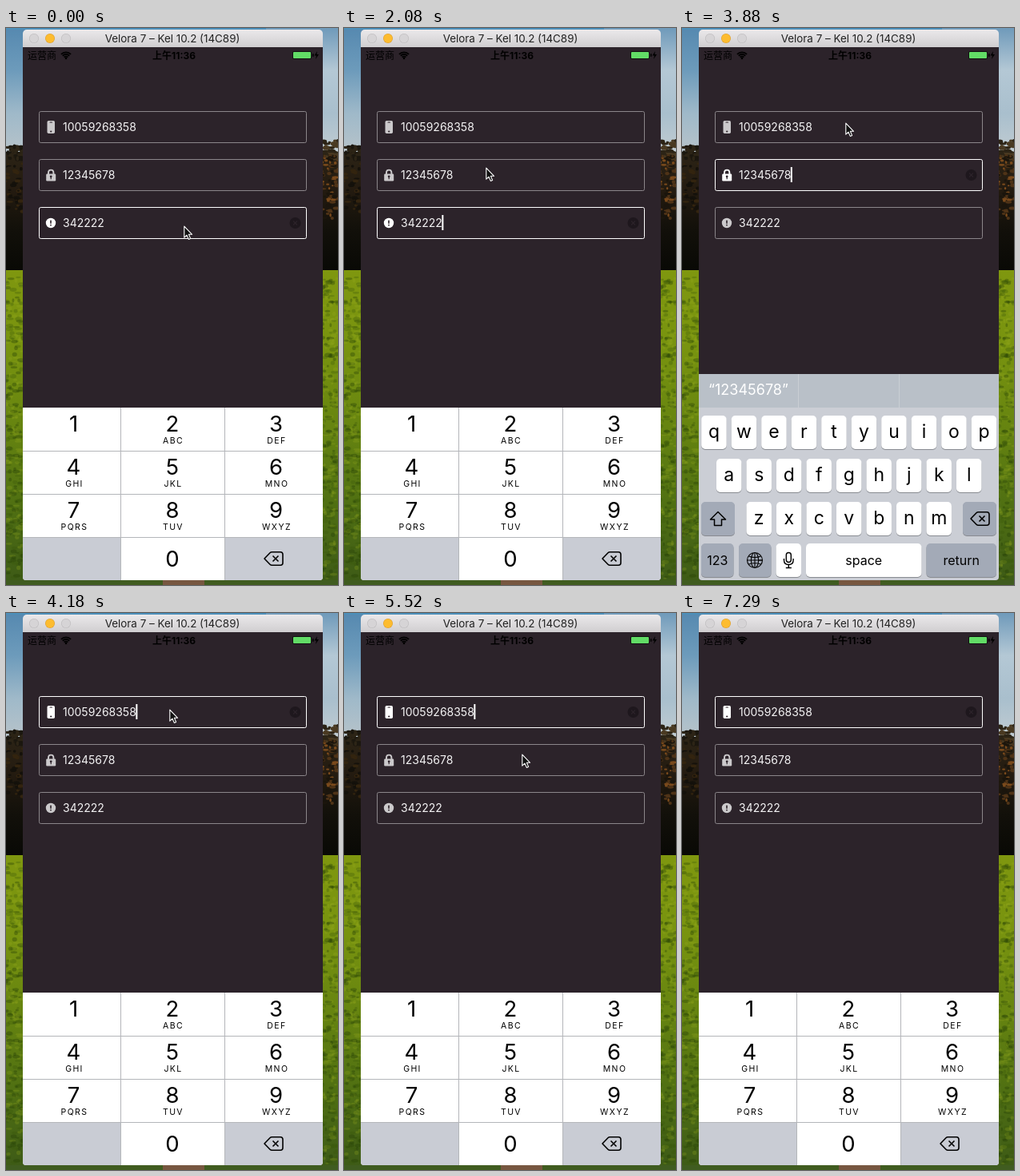
Write an HTML page with a canvas that moves like this. It is 415 by 697 pixels and loops after 7.39 s.

```html
<!DOCTYPE html>
<html lang="zh">
<head>
<meta charset="utf-8">
<style>
html, body { margin: 0; width: 415px; height: 697px; overflow: hidden; }
canvas { display: block; }
</style>
</head>
<body>
<canvas id="stage" width="415" height="697"></canvas>
<script>
const W = 415, H = 697, LOOP = 7390, STEPS = 50, DARK = '#2c232a';
const FONT = 'Inter, Roboto, sans-serif', CJK = '"Noto Sans CJK SC", "Noto Sans CJK", sans-serif';
const screen = document.getElementById('stage').getContext('2d');
let c = screen;

// All times below are counted in steps of the loop
const taps = [{ at: -12.5, field: 2 }, { at: 15, field: 1 }, { at: 28, field: 0 }, { at: 36, field: 0 }];
const pointer = [[2, 222, 247], [14, 177, 174], [19, 170, 182], [26, 204, 118],
  [28, 204, 120], [37, 222, 176], [45, 372, 634]];
const values = ['10059268358', '12345678', '342222'];

const clamp = v => Math.max(0, Math.min(1, v));
const smooth = v => v * v * (3 - 2 * v);

// Damped swing that starts two steps after a tap
const shakeAt = k => k < 0 ? 0 : 8.5 * Math.exp(-.87 * k) * Math.cos(Math.PI * k);
const caretAt = k => clamp(1.4 + 2 * Math.cos((k - 2) / 7.5 * 2 * Math.PI));

function pointerAt(n) {
  const i = pointer.findIndex(p => p[0] > n);
  const b = pointer[i], a = pointer[i - 1] || b;
  const k = a === b ? 0 : smooth((n - a[0]) / (b[0] - a[0]));
  return [a[1] + (b[1] - a[1]) * k, a[2] + (b[2] - a[2]) * k];
}

function box(x, y, w, h, r, fill) {
  c.beginPath();
  c.roundRect(x, y, w, h, r);
  if (fill) { c.fillStyle = fill; c.fill(); }
}

function outline(color, width = 1) {
  c.strokeStyle = color;
  c.lineWidth = width;
  c.stroke();
}

function disc(x, y, r, fill) {
  c.beginPath();
  c.arc(x, y, r, 0, 7);
  c.fillStyle = fill;
  c.fill();
}

function line(path, color, width = 1) {
  c.strokeStyle = color;
  c.lineWidth = width;
  c.stroke(new Path2D(path));
}

function text(s, x, y, size, { color = '#000', align = 'center', weight = 400, gap = 0, font = FONT } = {}) {
  c.font = `${weight} ${size}px ${font}`;
  c.letterSpacing = gap + 'px';
  c.textAlign = align;
  c.fillStyle = color;
  c.fillText(s, x, y);
}

function fade(y0, y1, ...stops) {
  const g = c.createLinearGradient(0, y0, 0, y1);
  stops.forEach((s, i) => g.addColorStop(i / (stops.length - 1), s));
  return g;
}

function landscape() {
  let seed = 7;
  const rnd = () => (seed = seed * 16807 % 2147483647) / 2147483647;
  const speckle = (count, x, y0, y1, size, ...colors) => {
    for (let i = 0; i < count; i++) {
      c.fillStyle = colors[Math.floor(rnd() * colors.length)];
      c.beginPath();
      c.ellipse(x + rnd() * 21, y0 + rnd() * (y1 - y0), size * (.4 + rnd()), size * (.3 + rnd() * .5), 0, 0, 7);
      c.fill();
    }
  };
  c.fillStyle = fade(0, 160, '#5689b0', '#6d9bbb', '#9fb9c9', '#b9c4ca');
  c.fillRect(0, 0, 208, 160);
  c.fillStyle = fade(0, 160, '#6f9aba', '#b4c8d5', '#a9bfcd', '#c3cdd2');
  c.fillRect(208, 0, 207, 160);
  c.fillStyle = '#4c8fb9';
  c.fillRect(0, 0, 325, 2);
  c.fillStyle = fade(150, 303, '#2c2416', '#241b10', '#12100a', '#090905');
  c.fillRect(0, 155, W, 148);
  speckle(30, 0, 148, 165, 4, '#2c2416', '#1b170f');
  speckle(45, 0, 165, 230, 3, '#33240f', '#14110b');
  speckle(40, 394, 140, 165, 4, '#2c2416', '#4a3a22');
  speckle(70, 394, 160, 240, 3, '#7a4a1c', '#1b150c', '#4f3317');
  c.fillStyle = fade(303, H, '#7f970f', '#78930f', '#668410', '#4f6f12', '#3d5a17');
  c.fillRect(0, 303, W, H - 303);
  for (const x of [0, 394])
    speckle(260, x, 312, 690, 3.5, 'rgba(35,60,5,.35)', 'rgba(150,170,30,.25)', 'rgba(55,85,10,.3)');
  c.fillStyle = '#405c20';
  c.fillRect(0, 691, W, 6);
  c.fillStyle = '#775740';
  c.fillRect(196, 691, 52, 6);
}

function chrome() {
  box(21, 2, 375, 30, 5, fade(2, 24, '#ebe9eb', '#d0ced0'));
  ['#d6d4d6', '#fdbc2f', '#d6d4d6'].forEach((fill, i) => {
    disc(35 + 20 * i, 13, 6, i === 1 ? '#dda034' : '#bdbbbd');
    disc(35 + 20 * i, 13, 5.4, fill);
  });
  text('Velora 7 – Kel 10.2 (14C89)', 208, 18, 13.4, { color: '#222' });
  box(21, 24, 375, 667, [0, 0, 4, 4], DARK);
  text('运营商', 27, 38.5, 12, { align: 'left', font: CJK });
  for (const r of [3.3, 6, 8.6]) {
    c.beginPath();
    c.arc(75, 39, r, -Math.PI * .75, -Math.PI * .25);
    outline('#000', 1.8);
  }
  disc(75, 38, 1.3, '#000');
  text('上午11:36', 210, 38.5, 12, { weight: 700, font: 'Inter, ' + CJK });
  box(358, 29, 24, 10, 2, '#111');
  box(359, 30, 22, 8, 1, '#62dc66');
  box(383, 32, 1.5, 4, 1, '#000');
  c.fill(new Path2D('M389 29L385.5 34.6H388L387 39L391 33H388.4Z'));
}

function erase(x, y) {
  c.lineJoin = 'round';
  line(`M${x - 12} ${y}l7 -7.3q1 -1 2.4 -1h10.6q3 0 3 3v10.6q0 3 -3 3h-10.6q-1.4 0 -2.4 -1z`, '#000', 1.6);
  line(`M${x - 1.5} ${y - 3.5}l7 7m0 -7l-7 7`, '#000', 1.6);
}

function keypad() {
  box(21, 475, 375, 216, [0, 0, 4, 4], '#fff');
  box(21, 638, 122, 53, [0, 0, 0, 4], '#c9ccd4');
  box(274, 638, 122, 53, [0, 0, 4, 0], '#c9ccd4');
  line('M21 529.5H396M21 583.5H396M21 637.5H396M143.5 475V691M273.5 475V691', '#b4b6ba');
  ',ABC,DEF,GHI,JKL,MNO,PQRS,TUV,WXYZ'.split(',').forEach((sub, i) => {
    const x = 84.5 + 126.5 * (i % 3) - 3 * (i % 3 === 1), y = 504.5 + 54 * Math.floor(i / 3);
    text(i + 1, x, y, 27.5);
    text(sub, x + 1, y + 15.5, 10.5, { gap: 1.4 });
  });
  text('0', 208, 674, 27.5);
  erase(335, 664);
}

function key(x, y, w, label, gray, size = 16) {
  box(x, y + 1, w, 42, 5, '#888b91');
  box(x, y, w, 42, 5, gray ? '#a3aab7' : '#fff');
  text(label, x + w / 2, y + (size > 20 ? 27.5 : 26.5), size);
}

function keyboard() {
  box(21, 433, 375, 258, [0, 0, 4, 4], '#cbced5');
  box(21, 433, 375, 42, 0, '#b9c0c8');
  line('M145.5 433V475M271.5 433V475', '#c9ced4');
  text('“12345678”', 83, 459, 18, { color: '#fff' });
  ['qwertyuiop', 'asdfghjkl', 'zxcvbnm'].forEach((row, r) => {
    const left = 208.7 - 18.75 * row.length + 3;
    [...row].forEach((ch, i) => key(left + 37.5 * i, 485 + 54 * r, 31.5, ch, false, 23));
  });
  key(24, 593, 42, '', true);
  key(351, 593, 42, '', true);
  key(24, 645, 40.5, '123', true);
  key(71, 645, 40.5, '', true);
  key(117.5, 645, 31.5, '');
  key(155, 645, 144.5, 'space');
  key(305.5, 645, 87.5, 'return', true);
  c.lineJoin = 'round';
  line('M45 605.5l9.5 9.5h-5v7.5h-9v-7.5h-5z', '#000', 1.5);
  erase(373, 614);
  c.beginPath();
  c.arc(91, 666, 9.5, 0, 7);
  c.ellipse(91, 666, 4.6, 9.5, 0, 0, 7);
  outline('#000', 1.1);
  line('M81.5 666H100.5M91 656.5V675.5M83.5 661Q91 664 98.5 661M83.5 671Q91 668 98.5 671', '#000', 1.1);
  box(130.3, 656.5, 6, 12, 3);
  outline('#000', 1.4);
  line('M127.5 664v2q0 5.5 5.8 5.5t5.8 -5.5v-2M133.3 671.5v4M129.8 675.5h7', '#000', 1.4);
}

const icons = [
  (y, color) => {
    box(51.5, y - 8, 9.5, 16, 1.8, color);
    box(54.5, y - 6.5, 3.5, 1, .5, DARK);
    disc(56.2, y + 5.5, 1.1, DARK);
  },
  (y, color) => {
    line(`M53 ${y}v-3q0 -3.4 3.2 -3.4t3.2 3.4v3`, color, 1.9);
    box(50.2, y - 1.5, 12, 9, 1.2, color);
    disc(56.2, y + 1.8, 1.4, DARK);
    box(55.6, y + 2, 1.2, 3.2, 0, DARK);
  },
  (y, color) => {
    disc(56, y, 6.2, color);
    box(55.2, y - 3.6, 1.6, 4.6, .8, DARK);
    disc(56, y + 2.7, .9, DARK);
  },
];

function field(i, active, shift, caret) {
  const y = 124 + 60 * i;
  c.save();
  c.translate(active ? shift : 0, 0);
  box(41.5, y - 19.5, 334, 39, 2);
  outline(active ? '#fff' : '#8b868a');
  icons[i](y, active ? '#fff' : '#cbc9cb');
  text(values[i], 71, y + 5, 14, { color: '#f4f3f4', align: 'left' });
  if (active) {
    const end = 71 + c.measureText(values[i]).width;
    disc(361.5, y, 7, '#1e171d');
    line(`M359 ${y - 2.5}l5 5m0 -5l-5 5`, DARK, 1.2);
    c.globalAlpha = caret;
    box(end - .5, y - 10, 2, 19, 0, '#fff');
  }
  c.restore();
}

function arrow(x, y) {
  c.save();
  c.translate(x, y);
  const shape = 'M.8 1.2V15.2L4 12.2L6.3 17.4L8.6 16.4L6.4 11.3H10.6Z';
  c.fillStyle = '#111';
  c.fill(new Path2D(shape));
  line(shape, '#fff', 1.1);
  c.restore();
}

const backdrop = document.createElement('canvas');
backdrop.width = W;
backdrop.height = H;
c = backdrop.getContext('2d');
landscape();
c = screen;

function draw(now) {
  const n = Math.floor(now % LOOP / LOOP * STEPS);
  const tap = taps.filter(e => e.at <= n).pop();
  const since = n - tap.at;
  c.drawImage(backdrop, 0, 0);
  chrome();
  values.forEach((_, i) => field(i, i === tap.field, shakeAt(since - 2), caretAt(since)));
  tap.field === 1 ? keyboard() : keypad();
  if (n < 45) arrow(...pointerAt(n));
}

const begin = performance.now();
(function tick() {
  draw(performance.now() - begin);
  requestAnimationFrame(tick);
})();
</script>
</body>
</html>
```
